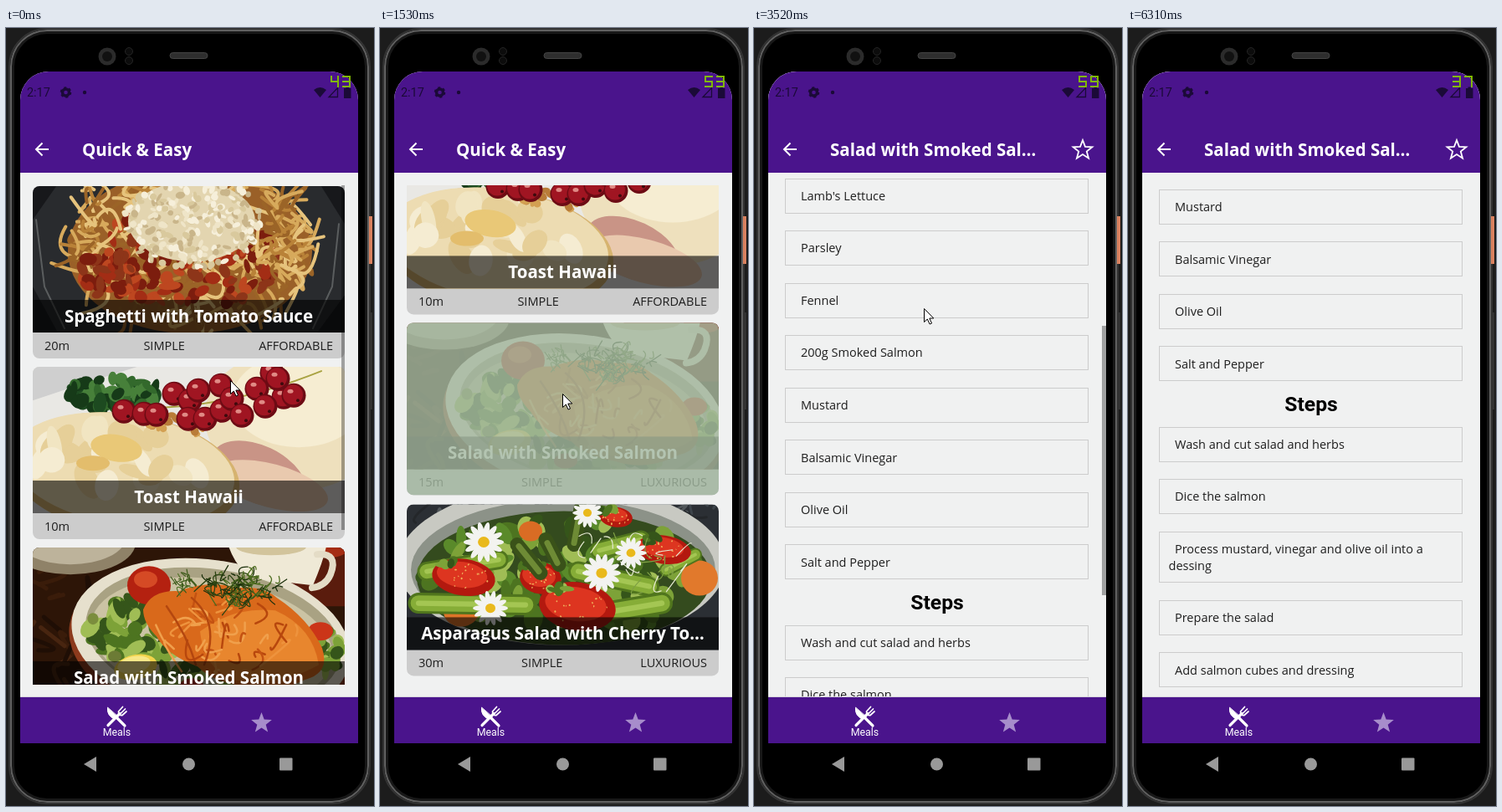
Write an HTML page that moves like this. It is 440 px wide and 930 px high and loops after 7430 ms.

```html
<!DOCTYPE html>
<html lang="en">
<head>
<meta charset="utf-8">
<title>Recipe app</title>
<style>
  html, body { margin: 0; width: 440px; height: 930px; overflow: hidden; background: #1c1c1c; }
  body { position: relative; font: 14.5px/19.6px "Open Sans", sans-serif; color: #1e1e1e; white-space: nowrap; }
  .phone, .display, .screen, header *, .view, .thumb, .overlay, .press, .band { position: absolute; }
  .phone { left: 3px; top: 0; width: 429px; height: 924px; border: 2px solid #333; border-radius: 46px; background: #000;
    box-shadow: inset 0 0 0 2px #606060, inset 0 0 0 5px #181818; }
  .display { left: 17px; top: 52px; width: 404px; height: 803px; border-radius: 34px 34px 0 0; overflow: hidden; background: #4a148c; }
  .screen { inset: 0; background: #f0f1f1; }
  header { height: 121px; background: #4a148c; }
  header b { left: 74px; top: 78px; font-size: 20.5px; line-height: 30px; color: #fff; }
  header svg { left: 0; top: 0; fill: none; stroke: #fff; stroke-width: 2; }
  .view { overflow: hidden; }
  .list { left: 15px; top: 136px; width: 373px; height: 597px; }
  .cards { padding-top: 1px; }
  .card { position: relative; height: 205.6px; margin-bottom: 10.6px; border-radius: 8px; overflow: hidden; background: #ccc; }
  .photo { display: block; width: 100%; height: 174.5px; }
  .band { top: 135.5px; width: 100%; height: 39px; background: #0009; color: #fff; font: bold 20.5px/39px "Open Sans", sans-serif; text-align: center; }
  .facts { display: flex; justify-content: space-between; padding: 0 14px; line-height: 31px; }
  .press { inset: 0; background: #a3b8a0; opacity: 0; }
  .detail { left: 0; top: 121px; width: 404px; height: 627px; }
  .recipe { display: flex; flex-direction: column; }
  .recipe .photo { height: 205.8px; flex: none; }
  .recipe .facts { line-height: 50.3px; }
  h2 { margin: 0; font: bold 24.7px/34.6px Roboto, sans-serif; height: 33.6px; text-align: center; color: #000; }
  .item { margin: 10.3px 21px 10.3px 20px; padding: 10.2px 10.5px; border: 1px solid #ccc; text-indent: 7.5px; }
  .thumb { right: 0; top: 0; background: #0005; }
  .overlay { left: 0; top: 0; font-family: Roboto, sans-serif; }
</style>
</head>
<body>
<div class="phone"></div>
<div class="display">
  <div class="screen">
    <header></header>
    <div class="view list"><div class="cards"></div><div class="thumb" style="width:4px;height:411.6px"></div></div>
  </div>
  <div class="screen" id="recipe">
    <header></header>
    <div class="view detail"><div class="recipe"></div><div class="thumb" style="width:5px;height:322px"></div></div>
  </div>
</div>
<svg class="overlay" width="440" height="930">
  <!-- bezel -->
  <rect x="434" y="225" width="4" height="57" fill="#d9815f"/>
  <path d="M436.5 340v116" stroke="#333" stroke-width="3"/>
  <circle cx="121" cy="34" r="10.5" fill="#2b2b2b"/><circle cx="121" cy="34" r="6" fill="#111"/>
  <g fill="#0c0c0c" stroke="#242424"><circle cx="147" cy="28" r="4.5"/><circle cx="147" cy="39" r="4.5"/></g>
  <rect x="196" y="29.5" width="45" height="7" rx="3.5" fill="#2e2e2e" stroke="#444"/>
  <!-- status bar -->
  <g fill="#1b0a38">
    <text x="25" y="82" font-size="14.4">2:17</text>
    <circle cx="71.5" cy="77" r="4" fill="none" stroke="#1b0a38" stroke-width="3.4"/>
    <circle cx="71.5" cy="77" r="5.8" fill="none" stroke="#1b0a38" stroke-width="2" stroke-dasharray="3 3.07"/>
    <circle cx="94" cy="77" r="2.2"/>
    <path d="M368 74q7.500-6 15 0l-7.500 9zM404 72h2.500v-1.500h3.500v1.500h2.500v12h-8.500z"/>
    <path d="M386 82.500h10.500v-11z" fill="none" stroke="#1b0a38" stroke-width="1.300"/>
  </g>
  <!-- tab bar -->
  <path d="M17 799.500h404" stroke="#d5d2dc"/>
  <rect x="17" y="800" width="404" height="55" fill="#4a148c"/>
  <g fill="none" stroke="#fff" stroke-linecap="round">
    <path d="M122 833.500l14-14M132 824l10 10" stroke-width="3.200"/>
    <path d="M134.500 817l5-5.500M137 819.500l5.500-5.500M139 821.500l5-4.500M134.500 817q0 5 4.500 4.500" stroke-width="1.700"/>
    <path d="M121.500 812.500q-1.500 9 8.500 14l4-3z" fill="#fff"/>
  </g>
  <text x="132.500" y="846" font-size="12.400" fill="#fff" text-anchor="middle">Meals</text>
  <path id="tabStar" fill="#a78dcb"/>
  <!-- navigation -->
  <g fill="#999"><path d="M93 880l15-9v18z"/><circle cx="218.500" cy="880" r="7.500"/><rect x="327" y="872.500" width="15.500" height="15" rx="1"/></g>
  <path id="fps" fill="none" stroke="#80b800" stroke-width="2"/>
  <path id="cursor" d="M.5.5v16l3.800-3.500 2.800 6 2.400-1-2.700-6h5z" fill="#fff" stroke="#000"/>
</svg>
<script>
const $ = (selector, root = document) => root.querySelector(selector);

// --- food pictures -------------------------------------------------------
let seed = 7;
const rnd = (min = 0, max = 1) => {
  seed = (seed * 16807) % 2147483647;
  return min + (max - min) * seed / 2147483647;
};
const pick = list => list[Math.floor(rnd(0, list.length))];
const repeat = (n, make) => Array.from({ length: n }, (_, i) => make(i)).join('');
const oval = (x, y, rx, ry, fill, turn = 0) =>
  `<ellipse cx="${x}" cy="${y}" rx="${rx}" ry="${ry}" fill="${fill}" transform="rotate(${turn} ${x} ${y})"/>`;
const line = (d, color, width) =>
  `<path d="${d}" fill="none" stroke="${color}" stroke-width="${width}" stroke-linecap="round"/>`;
const shape = (d, fill) => `<path d="${d}" fill="${fill}"/>`;
const inside = (cx, cy, rx, ry) => {
  const a = rnd(0, 2 * Math.PI), r = Math.sqrt(rnd());
  return [cx + rx * r * Math.cos(a), cy + ry * r * Math.sin(a)].map(v => +v.toFixed(1));
};
const blobs = (n, area, size, colors) => repeat(n, () =>
  oval(...inside(...area), rnd(.5, 1) * size, rnd(.3, .7) * size, pick(colors), rnd(0, 180)));
const strands = (n, area, length, width, colors) => repeat(n, () => {
  const [x, y] = inside(...area);
  const bend = () => rnd(-length, length).toFixed(1);
  return line(`M${x} ${y}q${bend()} ${bend()} ${bend()} ${bend()}`, pick(colors), width);
});
const photo = (ground, ...parts) =>
  `<svg class="photo" viewBox="0 -8 373 190.2" preserveAspectRatio="xMidYMid slice">
    <rect y="-8" width="373" height="191" fill="${ground}"/>${parts.join('')}</svg>`;

const leaf = ['#4d7420', '#7da238', '#a0bd55', '#35551a'];
const noodle = ['#d7aa5c', '#b98238', '#e6c37c', '#9b6427'];
const sauce = ['#a32d15', '#7c1d0e', '#bd4720', '#8d3519'];

const spaghetti = photo('#17181b',
  shape('M0 40L28 0H345L373 45V130L340 175H30L0 120z', '#292b2e'),
  line('M4 40L14 120L38 170M366 45L358 120L335 170', '#5a5d5e', 2),
  oval(188, 78, 146, 98, '#9a6028'),
  strands(150, [190, 75, 138, 92], 38, 4, noodle),
  blobs(150, [183, 85, 115, 65], 11, sauce),
  strands(45, [300, 70, 30, 70], 30, 4, noodle),
  strands(25, [65, 60, 20, 60], 28, 4, noodle),
  blobs(50, [95, 105, 38, 28], 11, sauce),
  oval(190, 42, 76, 48, '#e3d5b0'),
  blobs(260, [190, 42, 84, 56], 6, ['#efe5c8', '#d9c99d', '#f6efda', '#c9b58a']));

const berries = [109,53, 133,56, 148,57, 169,32, 188,40, 198,28, 186,62, 206,62, 225,22, 226,52,
  238,38, 250,58, 268,26, 286,7, 300,36, 312,34, 278,47, 293,14];
const toast = photo('#e9e8e4',
  shape('M0 -8H150L60 20L0 40z', '#cfcfcf'),
  blobs(60, [95, 32, 55, 20], 13, ['#1d4a20', '#33692c', '#47803a', '#163a18']),
  oval(310, 65, 105, 82, '#eee0bd', 8), oval(318, 40, 80, 56, '#f6edd2'),
  oval(270, 128, 60, 34, '#c99486', 25), oval(285, 142, 70, 26, '#e9c9ae', 15),
  oval(110, 128, 138, 72, '#d6b36f', 8), oval(108, 122, 134, 66, '#eddcb2', 8),
  blobs(26, [110, 108, 105, 42], 24, ['#f1e5c2', '#e6cf98', '#f5ecd2']),
  oval(100, 97, 31, 16, '#e9c877', 10), oval(72, 115, 20, 9, '#e3bd6c'),
  blobs(18, [175, 68, 42, 16], 7, ['#d3a052', '#b97c38']),
  line('M110 48Q220 55 345 5', '#a9a343', 2),
  repeat(berries.length / 2, i => {
    const x = berries[2 * i], y = berries[2 * i + 1];
    return oval(x, y, 14.5, 14.5, '#6d0b14') + oval(x - 1, y - 1, 12, 12, '#a01522') +
      oval(x - 4, y - 5, 3.5, 2.5, '#e08a85') + oval(x + 5, y + 6, 2, 2, '#3d0a0d');
  }));

const salmon = photo('#2d1507',
  strands(20, [30, 100, 60, 80], 40, 5, ['#3a1c0a', '#1f0e05', '#482510']),
  oval(45, -6, 78, 38, '#8f8268'), oval(45, -12, 66, 32, '#bdb39b'),
  shape('M255 -8H373V70H300z', '#5a1c0d'), oval(355, -2, 24, 14, '#a52d14'),
  oval(212, 118, 170, 98, '#8c3a1c', 9), oval(213, 110, 168, 95, '#e6e0cd', 9), oval(216, 108, 154, 82, '#a9a283', 9),
  oval(214, 112, 146, 74, '#cbc3a4', 9),
  shape('M232 -8Q245 35 275 38L335 45Q350 10 352 -8z', '#efe9d6'), oval(285, -1, 42, 10, '#d2c49c'),
  line('M340 8q26 -2 16 24q-6 14 -22 16', '#e4dcc6', 8),
  blobs(75, [125, 100, 58, 40], 15, leaf), blobs(55, [230, 155, 85, 22], 14, leaf), blobs(25, [353, 125, 16, 26], 13, leaf),
  oval(139, 45, 26, 23, '#b42110'), oval(135, 38, 14, 10, '#d54a25'), oval(344, 100, 15, 11, '#cb3518'),
  oval(72, 85, 6.5, 7, '#7b8d3d'), oval(98, 130, 8, 7, '#6c7b35'),
  oval(123, 143, 26, 15, '#f2d44b', -12), oval(121, 140, 20, 10, '#f8e787', -12), oval(190, 165, 14, 9, '#b22913'),
  shape('M132 74Q142 50 175 52Q210 38 245 48Q275 45 292 60Q330 85 346 120Q356 150 325 158Q285 178 248 165Q215 160 197 142Q160 128 148 106Q132 90 132 74z', '#d9691b'),
  shape('M200 100Q240 70 290 75Q335 95 342 140Q300 165 240 158Q205 145 200 100z', '#e8862e'),
  strands(36, [235, 105, 80, 42], 28, 2.500, ['#f0a04c', '#c45212', '#ee933d', '#b8470d']),
  line('M160 70Q185 105 195 140M190 60Q225 90 205 140', '#b4470f', 2.500),
  strands(90, [250, 48, 45, 18], 16, 1.300, ['#2c4312', '#4c6b1e', '#1c300c']),
  strands(18, [178, 42, 12, 9], 12, 1.200, ['#3d5a1a', '#54752a']));

const strawberry = (x, y, rx, ry) => oval(x, y, rx, ry, '#b3190f', 8) + oval(x - 2, y - 3, rx * .8, ry * .7, '#dd3520', 8) +
  blobs(18, [x, y, rx * .8, ry * .75], 1.500, ['#f0b35c']) + blobs(6, [x - rx * .5, y - ry * .8, 12, 4], 9, leaf);
const daisy = (x, y, r) => repeat(14, i =>
  oval(x + r * .55, y, r * .5, r * .16, '#f3f3f0').replace(/rotate\(0 .*?\)/, `rotate(${i * 25.7} ${x} ${y})`)) +
  oval(x, y, r * .3, r * .28, '#e9b91c');
const stalk = (d, width) => line(d, '#50751d', width) + line(d, '#86ad37', width * .75) + line(d, '#a4c653', width * .25);
const asparagus = photo('#2b2f34',
  strands(40, [190, 5, 190, 20], 30, 3, ['#3d444a', '#51575a', '#24272a']),
  oval(185, 72, 196, 96, '#c8c9c2'), oval(187, 78, 182, 84, '#8c9288'),
  oval(188, 88, 176, 80, '#344b1e'),
  blobs(130, [190, 85, 165, 68], 17, [...leaf, '#5a8a2a']),
  oval(65, 128, 21, 18, '#df7428'), oval(350, 88, 22, 21, '#e1792c'), oval(148, 32, 14, 12, '#d96c24'), oval(205, 125, 18, 12, '#dc7027'),
  stalk('M24 80L110 66', 23), stalk('M14 118L142 120', 25), stalk('M205 80L290 98', 24), stalk('M245 128L305 118', 26),
  stalk('M230 55L280 42', 22), stalk('M310 78L345 60', 16),
  strawberry(250, 15, 20, 12), strawberry(307, 54, 33, 17), strawberry(68, 87, 38, 22),
  strawberry(160, 88, 25, 19), strawberry(204, 122, 46, 29),
  line('M132 48L160 82M166 42L182 72M208 5L200 48', '#3a5219', 17), line('M134 50L158 80M168 46L180 70M207 8L200 46', '#6e8b35', 7),
  strands(20, [270, 65, 70, 30], 25, 1.200, ['#e6ead2', '#7fa043']),
  daisy(92, 45, 23), daisy(233, 82, 22), daisy(100, 124, 20), daisy(268, 58, 18), daisy(216, 10, 17));

// --- screens -------------------------------------------------------------
const star = (cx, cy, r) => 'M' + Array.from({ length: 10 }, (_, i) => {
  const a = i * Math.PI / 5, d = i % 2 ? r * .42 : r;
  return `${cx + d * Math.sin(a)} ${cy - d * Math.cos(a)}`;
}).join('L') + 'z';

const header = (title, extra = '') =>
  `<b>${title}</b><svg width="404" height="121"><path d="M34 93H19.500M26.500 85.500L19 93l7.500 7.500"/>${extra}</svg>`;
const facts = (...words) => `<div class="facts">${words.map(w => `<span>${w}</span>`).join('')}</div>`;
const card = (picture, title, ...words) =>
  `<div class="card">${picture}<div class="band">${title}</div>${facts(...words)}<div class="press"></div></div>`;
const section = (title, items) => `<h2>${title}</h2>` + items.map(i => `<div class="item">${i}</div>`).join('');

const [listHeader, recipeHeader] = document.querySelectorAll('header');
listHeader.innerHTML = header('Quick &amp; Easy');
recipeHeader.innerHTML = header('Salad with Smoked Sal…', `<path d="${star(376, 94, 12)}" stroke-width="1.800"/>`);
$('#tabStar').setAttribute('d', star(305.5, 831, 13));
$('.cards').innerHTML =
  card(spaghetti, 'Spaghetti with Tomato Sauce', '20m', 'SIMPLE', 'AFFORDABLE') +
  card(toast, 'Toast Hawaii', '10m', 'SIMPLE', 'AFFORDABLE') +
  card(salmon, 'Salad with Smoked Salmon', '15m', 'SIMPLE', 'LUXURIOUS') +
  card(asparagus, 'Asparagus Salad with Cherry To…', '30m', 'SIMPLE', 'LUXURIOUS');
$('.recipe').innerHTML = salmon + facts('15m', 'SIMPLE', 'LUXURIOUS') +
  section('Ingredients', ['Arugula', "Lamb's Lettuce", 'Parsley', 'Fennel', '200g Smoked Salmon',
    'Mustard', 'Balsamic Vinegar', 'Olive Oil', 'Salt and Pepper']) +
  section('Steps', ['Wash and cut salad and herbs', 'Dice the salmon',
    'Process mustard, vinegar and olive oil into a<br>dessing', 'Prepare the salad', 'Add salmon cubes and dressing']);

// --- motion: keys are [step, ...values], the screen refreshes once per step ---
const LOOP = 7430, STEP = 131, LEAD = 55;
const pointer = [[0, 268, 421], [1, 245, 591], [2, 243, 560], [5, 229, 304], [8, 229, 304], [11, 218, 437], [13, 218, 437],
  [18, 227, 693], [27, 203, 335], [32, 192, 148], [33, 190, 143], [35, 168, 575], [37, 164, 535], [41, 58, 590],
  [43, 356, 808], [44, 353, 850], [45, 351, 880], [46, 338, 880], [47, 336, 910], [48, 336, 940]];
const listScroll = [[1, 0], [2, 35], [5, 249], [7, 268.6]];
const listBar = [[8, 1], [10, 0]];
const pressed = [[10, 0], [12, .82]];
const enter = [[12, 0, 50], [13, .35, 30], [14, .75, 12], [15, .95, 3], [16, 1, 0]];
const recipeScroll = [[18, 0], [27, 356], [33, 548], [36, 587], [37, 588.7], [41, 593]];
const recipeBar = [[43, 1], [45, 0]];
const rates = [[0, 43], [4, 36], [12, 53], [19, 50], [27, 59], [34, 56], [42, 37]];

const at = (keys, step) => {
  const next = keys.findIndex(k => k[0] > step);
  if (next < 1) return (next ? keys[keys.length - 1] : keys[0]).slice(1);
  const a = keys[next - 1], b = keys[next], p = (step - a[0]) / (b[0] - a[0]);
  return a.slice(1).map((v, i) => v + (b[i + 1] - v) * p);
};

const segments = { a: 'M0 1h10', b: 'M9 0v7', c: 'M9 7v7', d: 'M0 13h10', e: 'M1 7v7', f: 'M1 0v7', g: 'M0 7h10' };
const digits = { 0: 'abcdef', 3: 'abcdg', 4: 'bcfg', 5: 'acdfg', 6: 'acdefg', 7: 'abc', 9: 'abcdfg' };
const counter = value => [...String(value)].map((digit, i) => [...digits[digit]].map(s =>
  segments[s].replace(/M(\d+) (\d+)/, (_, x, y) => `M${388 + 14 * i + +x} ${57 + +y}`)).join('')).join('');

const cards = $('.cards'), recipe = $('.recipe'), recipeScreen = $('#recipe'), press = document.querySelectorAll('.press')[2];
const listThumb = $('.list .thumb'), recipeThumb = $('.detail .thumb'), fps = $('#fps'), cursor = $('#cursor');

function scroll(content, thumb, offset, ratio, opacity) {
  content.style.transform = `translateY(${-offset}px)`;
  thumb.style.transform = `translateY(${offset * ratio}px)`;
  thumb.style.opacity = opacity;
}

function draw() {
  const step = Math.floor((performance.now() % LOOP + LEAD) / STEP);
  const [opacity, rise] = at(enter, step), [x, y] = at(pointer, step);
  scroll(cards, listThumb, at(listScroll, step)[0], .689, at(listBar, step)[0]);
  scroll(recipe, recipeThumb, at(recipeScroll, step)[0], .514, at(recipeBar, step)[0]);
  press.style.opacity = at(pressed, step)[0];
  recipeScreen.style.opacity = opacity;
  recipeScreen.style.transform = `translateY(${rise}px)`;
  fps.setAttribute('d', counter(rates.filter(r => r[0] <= step).pop()[1]));
  cursor.setAttribute('transform', `translate(${x} ${y})`);
  requestAnimationFrame(draw);
}
draw();
</script>
</body>
</html>
```
